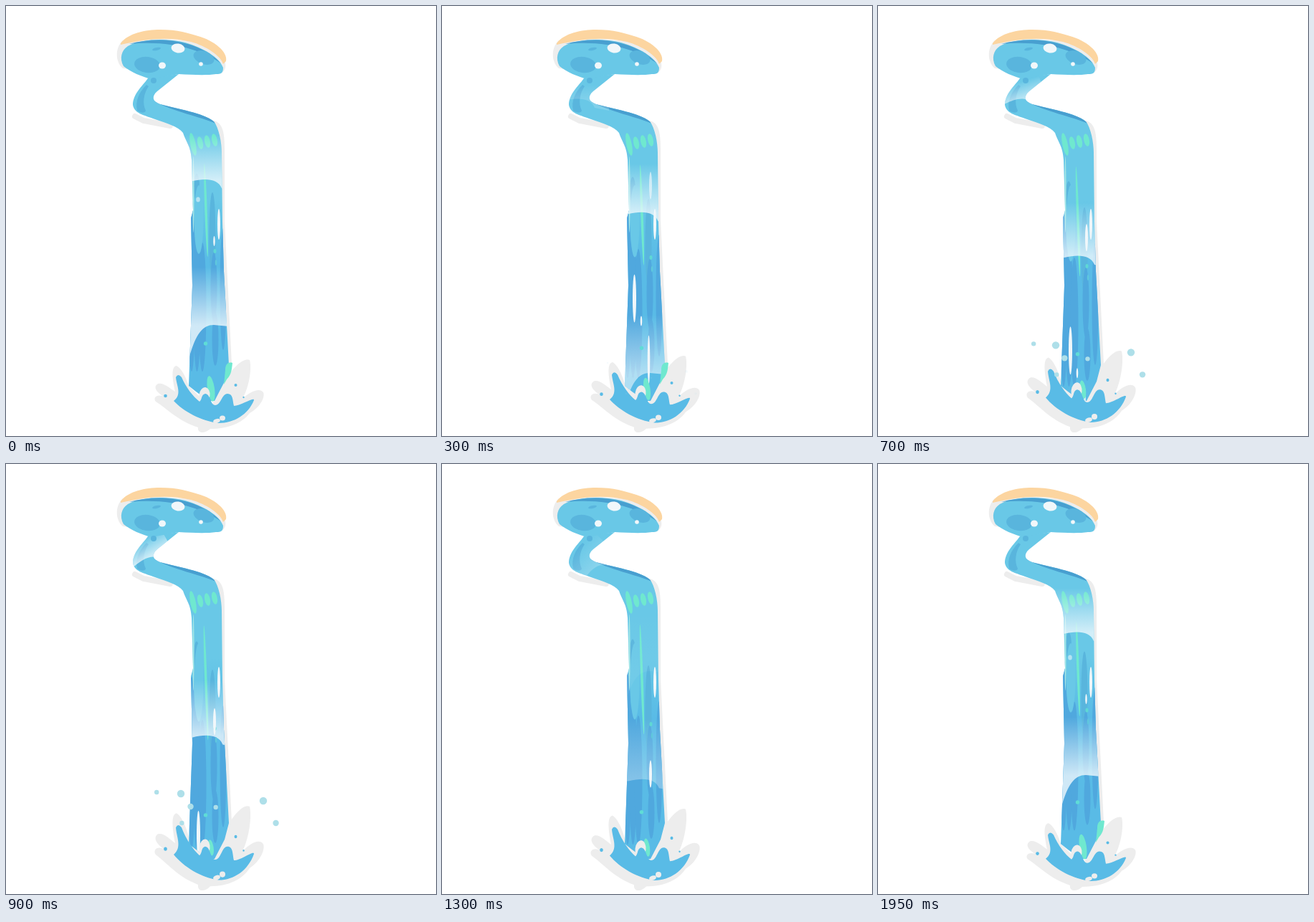
An HTML page with a canvas for the animation above (2000 ms loop, 600 by 600 pixels).

```html
<!DOCTYPE html>
<html>
<head>
<meta charset="utf-8">
<style>
html, body { margin: 0; height: 100%; overflow: hidden; background: #fff; }
canvas { display: block; }
</style>
</head>
<body>
<canvas id="stage" width="600" height="600"></canvas>
<script>
const ctx = document.getElementById('stage').getContext('2d');
const LOOP = 2000, STEP = 50;
const GREY = '#ededed', LIGHT = '#69c8e7', BLUE = '#59bbe6', SHADE = '#59b5dd',
  DEEP = '#50a8de', RIM = '#489fd0', MINT = '#6fe8cf', FOAM = '#f1f7fa', SPRAY = '#aedfe9';

const body = new Path2D('M198 101C190 112 177 123 177 138C179 150 192 152 205 157C225 164 240 168 247 177C251 190 258 195 259 215L261 285L258 296L260 390L255 530L265 538L283 551H291L305 524L311 501L304 370L302 300L301 205C301 190 297 170 290 161C275 149 240 144 215 137C204 133 203 126 211 119L241 95Z');
const rightEdge = new Path2D('M290 160C303 163 305 178 305 200V300L315 500L300 540L285 200Z');
const rampShade = new Path2D('M207 133C235 141 275 145 293 164C270 154 235 148 207 133Z');
const neckShade = new Path2D('M196 110C186 120 180 132 183 146C188 150 195 149 195 146C190 136 192 122 199 112Z');
const poolGrey = new Path2D('M163 48C152 58 152 78 163 87L190 90L300 94C307 90 308 82 304 74L270 50L200 44Z');
const poolOrange = new Path2D('M160 52C170 38 195 33 215 33C240 33 255 38 268 42C290 48 310 64 307 77L303 81C300 70 280 56 258 50C225 42 195 46 160 54Z');
const poolBlue = new Path2D('M170 56C190 45 225 45 250 51C275 58 298 72 303 86C303 94 300 95 293 95C280 97 260 96 241 95L203 102C190 99 174 92 164 84C158 73 161 62 170 56Z');
const poolRim = new Path2D('M172 53C215 41 270 48 300 80C275 62 230 47 172 53Z');
const crown = new Path2D('M255 530C250 515 244 505 238 502C230 503 232 520 236 538C228 533 220 525 212 527C204 532 211 540 222 546C212 540 204 546 209 552C225 562 240 579 268 588C267 596 276 598 285 590C310 590 330 582 340 568C355 560 362 545 359 539C354 532 340 538 330 548C340 530 343 505 340 494C332 490 315 505 305 525L285 560Z');
const splash = new Path2D('M237 518C238 530 246 542 234 551C248 566 272 579 297 582C318 582 338 570 346 550C346 545 328 558 318 558C316 550 317 541 309 541C301 541 300 557 292 557C285 557 286 542 278 541C272 542 274 549 270 552C261 545 251 532 245 518Q240 512 237 518Z');
const rightMint = new Path2D('M316 498C309 496 306 501 306 508L304 528L308 521C315 514 315 506 316 498Z');

const clamp = v => Math.max(0, Math.min(1, v));
const bell = p => Math.sin(Math.PI * clamp(p));
const fill = (path, color) => { ctx.fillStyle = color; ctx.fill(path); };

function oval(x, y, rx, ry = rx, color = FOAM, turn = 0) {
  ctx.fillStyle = color;
  ctx.beginPath();
  ctx.ellipse(x, y, rx, ry, turn, 0, 7);
  ctx.fill();
}

const streak = (x, top, bottom, width, color, turn) =>
  oval(x, (top + bottom) / 2, width / 2, (bottom - top) / 2, color, turn);

// Runs a drawing with everything scaled vertically about a fixed bottom line
function stretched(bottom, amount, paint) {
  ctx.save();
  ctx.translate(0, bottom);
  ctx.scale(1, 1 + amount);
  ctx.translate(0, -bottom);
  paint();
  ctx.restore();
}

const flatEdge = new Path2D('M-40 -90V4L-22 2C-5 -2 14 -3 20 12L40 16V-90Z');
const domeEdge = new Path2D('M-40 -90V65L-26 43C-17 12 -8 -1 8 -1L40 2V-90Z');

// A pale gradient that ends in a hard lower edge at x, y
function wave(edge, x, y, length, strength, turn = 0) {
  if (strength <= 0) return;
  const pale = a => `rgba(240,249,253,${a})`;
  const g = ctx.createLinearGradient(0, -length, 0, 0);
  g.addColorStop(0, pale(0));
  g.addColorStop(1, pale(strength));
  ctx.save();
  ctx.translate(x, y);
  ctx.rotate(turn);
  ctx.beginPath();
  ctx.rect(-40, -length, 80, length + 70);
  ctx.clip();
  fill(edge, g);
  ctx.restore();
}

// Slow through the neck, faster over the ramp, then steady down the column
function streamWave(t) {
  const p = clamp((t - 300) / 1650);
  if (p < 1) {
    const x = 193 + 88 * clamp((p / .82) ** 5.5);
    const strength = .15 + .6 * Math.cos(Math.PI * (p - .36) / .64) ** 2;
    wave(flatEdge, x, 130 + 105 * p ** 3.5, 20 + 42 * p * p,
      strength * clamp((t - 200) / 100), -.8 * bell(p ** 1.5));
  } else {
    const fall = t - 1950;
    wave(flatEdge, 281 + fall / 700, 235 + .152 * fall, 62 + fall / 60, .78 * clamp((3550 - t) / 600));
  }
}

const domeWave = t =>
  wave(domeEdge, 282, 290 + .223 * (t - 1300), 82, .8 * bell((t - 1150) / 1700) ** 2);

// A highlight that falls down the column while it fades in and out
function glint(t, x, y, length, width, life) {
  const age = t - 160;
  ctx.globalAlpha = clamp(2.5 * bell(age / life));
  streak(x, y + age * .182, y + age * .182 + length, width, FOAM);
  ctx.globalAlpha = 1;
}

function pool() {
  fill(poolGrey, GREY);
  fill(poolOrange, '#fcd5a0');
  fill(poolBlue, LIGHT);
  fill(poolRim, RIM);
  oval(197, 82, 18, 11, SHADE, .12);
  oval(276, 72, 15, 9, SHADE, .35);
  oval(210, 60, 6, 2, SHADE, -.2);
  oval(206, 104, 4, 4, SHADE);
  oval(240, 59, 9.5, 6.5, FOAM, .15);
  oval(218, 83, 5, 4.5);
  oval(272, 81, 2.8);
}

function column(t, swing) {
  const d = 30 * swing;
  const base = ctx.createLinearGradient(0, 270, 0, 355);
  base.addColorStop(0, LIGHT);
  base.addColorStop(1, BLUE);

  ctx.save();
  ctx.clip(body);
  ctx.fillStyle = base;
  ctx.fillRect(150, 80, 200, 500);
  fill(neckShade, SHADE);
  fill(rampShade, RIM);

  for (let i = 0; i < 3; i++)
    streak(259 + 7.5 * i, 270 + 30 * i + d, 510 + d, 11, DEEP);
  for (let i = 0; i < 3; i++)
    streak(288 + 2 * i, 260 + 84 * i + d, 382 + 60 * i + d, 9, i ? DEEP : SHADE);
  streak(303, 310 + d, 480 + d, 9, DEEP);
  streak(266, 234 + d / 2, 272 + d / 2, 8, SHADE);
  streak(269, 250, 346 + d / 2, 13, LIGHT);
  streak(261.5, 210, 316, 2, '#a5e8e6');

  for (let i = 0; i < 4; i++)
    oval(261 + 10 * i, 193 - 2 * i, 3.8, i ? 9 : 16, MINT, -.2);
  streak(279, 220 + d / 5, 350 + 1.3 * d, 3.5, MINT, -.035);

  for (const time of [t, t + LOOP]) {
    streamWave(time);
    domeWave(time);
  }

  oval(291.5, 342 + d, 2, 3, '#5fd8d4');
  oval(293, 358 + d, 1.2, 4, '#5fc8dc');
  oval(278.5, 471 + .7 * d, 2.7, 2.7, '#5fdcd6');
  streak(297, 283, 326, 4);
  if (swing < .2) {
    oval(268, 270, 2.8, 3.5, '#b5e3f2');
    streak(290.5, 321, 335, 2.5);
  }
  glint(t, 291, 206, 38, 4, 1650);
  glint(t, 268.5, 349, 67, 5, 950);
  glint(t, 288.5, 434, 68, 3.5, 600);
  glint(t, 278, 407, 14, 2.5, 700);
  ctx.restore();
}

function splashFront(swing) {
  if (swing < .7) fill(rightMint, MINT);
  streak(286, 516 + 9 * swing, 552 - 6 * swing, 10 - 3 * swing, MINT, -.15);
  stretched(592, .16 * swing, () => {
    oval(277, 543, 7.5, 11, GREY, .12);
    fill(splash, BLUE);
    oval(222.5, 544, 2.3, 2.3, BLUE);
    oval(320.5, 529, 2, 2, BLUE);
    oval(331.5, 546, 1.2, 1.2, BLUE);
    oval(302, 575, 4, 3.6, GREY);
    oval(294, 579, 5, 2.8, GREY, -.3);
  });
}

// Drops rise and spread away from the middle of the splash
const drops = [[231, 498], [256, 500], [266, 518], [292, 519], [341, 510], [354, 541], [257, 541]];

function droplets(t) {
  const rise = clamp((t - 300) / 630);
  const grow = clamp(.35 + (t - 280) / 450);
  ctx.globalAlpha = Math.min(clamp((t - 280) / 180), clamp((1300 - t) / 300));
  drops.forEach(([x, y], i) =>
    oval(x + .37 * (x - 290) * rise, y - 42 * rise, (3.2 + i * 2 % 3) * grow, undefined, SPRAY));
  ctx.globalAlpha = 1;
}

function draw(t) {
  const swing = 1 - Math.abs(t / 1000 - 1);
  ctx.clearRect(0, 0, 600, 600);

  ctx.strokeStyle = GREY;
  ctx.lineCap = 'round';
  ctx.lineWidth = 8;
  ctx.stroke(new Path2D('M180 154L192 160L229 167'));
  fill(rightEdge, GREY);
  column(t, swing);
  // The crown stays behind the water
  ctx.globalCompositeOperation = 'destination-over';
  stretched(595, .175 * swing, () => fill(crown, GREY));
  ctx.globalCompositeOperation = 'source-over';
  pool();
  splashFront(swing);
  droplets(t);
}

const start = performance.now();
function tick() {
  const t = (performance.now() - start) % LOOP;
  draw(Math.floor(t / STEP) * STEP);
  requestAnimationFrame(tick);
}
tick();
</script>
</body>
</html>
```
